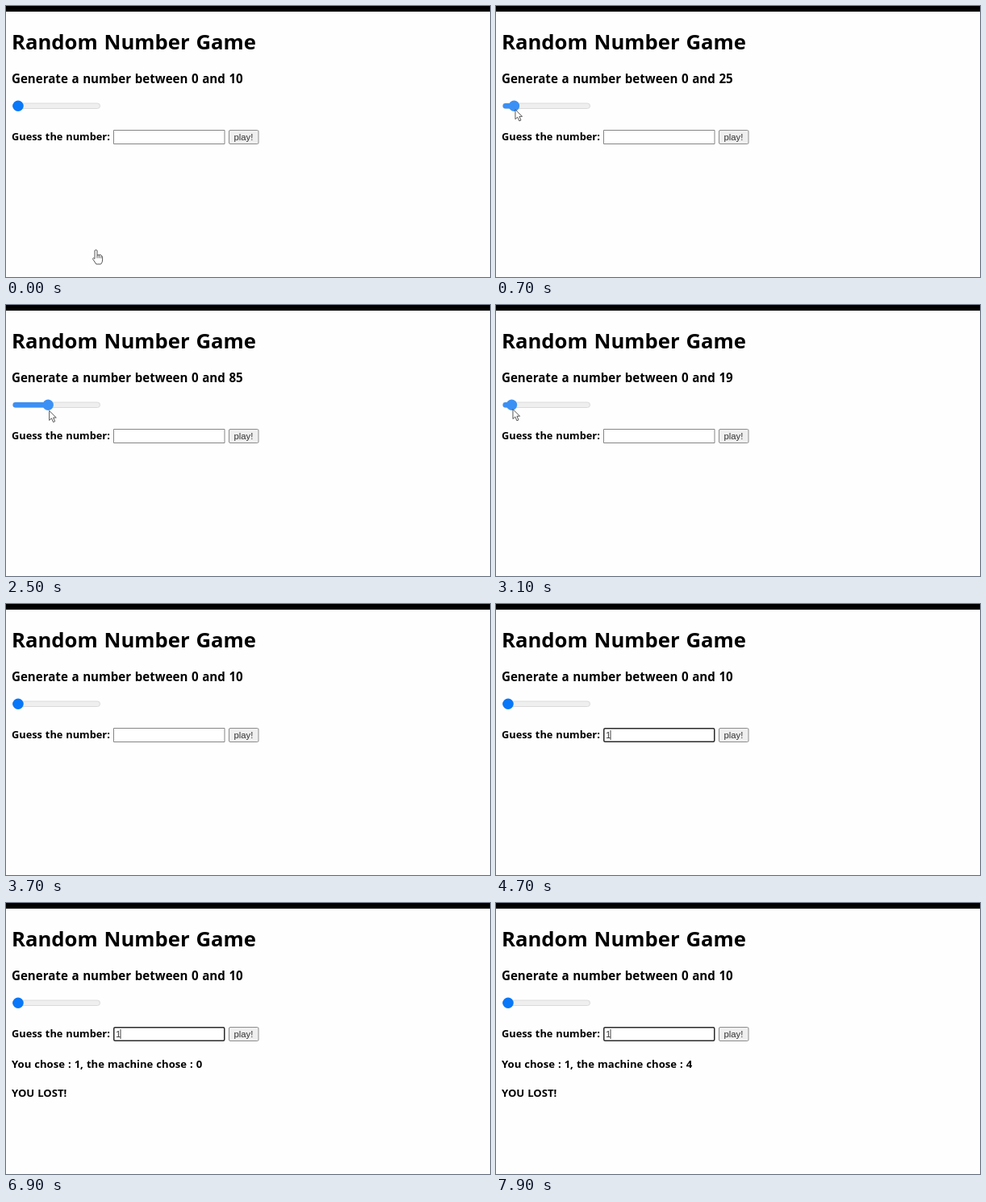
These frames come from a looping animation (600x337 px, 8 s). An HTML page with a canvas:

```html
<!DOCTYPE html>
<html lang="en">
<head>
<meta charset="utf-8">
<title>Random Number Game</title>
<style>
  html, body { margin: 0; width: 100%; height: 100%; overflow: hidden; background: #fefefe; }
  canvas { display: block; width: 600px; height: 337px; }
</style>
</head>
<body>
<canvas id="stage"></canvas>
<script>
const LOOP = 8000, TICK = 100;
const GRAB = 500, RELEASE = 3200, LEAVE = 3500, FOCUS = 3800, TYPE = 4400, RESULT = 5000;
const HEADING = '"Open Sans", "Noto Sans", sans-serif';
const CONTROL = '"Liberation Sans", Arial, sans-serif';

const canvas = document.getElementById('stage');
const ctx = canvas.getContext('2d');
const ratio = window.devicePixelRatio || 1;
canvas.width = 600 * ratio;
canvas.height = 337 * ratio;

const progress = (t, from, to) => Math.min(1, Math.max(0, (t - from) / (to - from)));
const mix = (a, b, u) => a + (b - a) * u;

// The drag goes right and back again at one steady speed.
const sliderValue = t => Math.max(10, Math.round(153 - 0.109 * Math.abs(t - 1875)));
const thumbX = value => 15 + (value - 10) * 0.4956;

function pointerAt(t) {
  const arrive = progress(t, 0, GRAB);
  const leave = progress(t, RELEASE, LEAVE + TICK);
  const dragX = thumbX(sliderValue(t)) + 1.5;
  const dragY = 130 + 2 * Math.sin((t - 1100) / 600);
  return [
    mix(mix(110, dragX, arrive), 70, leave),
    mix(mix(304, dragY, arrive), 154, leave)
  ];
}

function machineNumber(t) {
  const round = Math.max(0, Math.floor((t - 5400) / 480));
  return (4 + 2 * round) % 10;
}

function heading(str, baseline, size) {
  ctx.font = `700 ${size}px ${HEADING}`;
  ctx.wordSpacing = `${size * 0.045}px`;
  ctx.fillStyle = '#000';
  ctx.fillText(str, 7, baseline);
}

function label(str, x, baseline) {
  ctx.font = `11.3px ${CONTROL}`;
  ctx.wordSpacing = '0px';
  ctx.fillStyle = '#333';
  ctx.fillText(str, x, baseline);
}

function box(x, y, w, h, radius, fill, stroke, line = 1) {
  ctx.beginPath();
  ctx.roundRect(x + line / 2, y + line / 2, w - line, h - line, radius);
  ctx.fillStyle = fill;
  ctx.fill();
  if (!stroke) return;
  ctx.strokeStyle = stroke;
  ctx.lineWidth = line;
  ctx.stroke();
}

function slider(value, hover) {
  const x = thumbX(value);
  const blue = hover ? '#3b90f5' : '#0877f8';
  box(8, 120.5, 109, 7.5, 3.5, '#efefef', '#dadada');
  box(8, 120.5, x - 8, 7.5, 3.5, blue);
  ctx.beginPath();
  ctx.arc(x, 124.3, 6.7, 0, Math.PI * 2);
  ctx.fillStyle = blue;
  ctx.fill();
}

const arrow = new Path2D('M0 0V12L2.8 9.4L4.9 14.2L7 13.3L5 8.6H8.6Z');
const hand = new Path2D('M0 0Q1.5-1.5 3 0V6Q8 4 9.6 8V12Q9.6 15 7.6 17H1.8L-2.5 10.5Q-2 8 0 10.4Z' +
  'M3 6V9.5M5.4 6V9.5M7.8 6.7V9.7');

function pointer(shape, x, y) {
  ctx.save();
  ctx.translate(x, y);
  ctx.fillStyle = '#fff';
  ctx.fill(shape);
  ctx.strokeStyle = '#444';
  ctx.lineWidth = 0.9;
  ctx.lineJoin = 'round';
  ctx.stroke(shape);
  ctx.restore();
}

function guessField(t) {
  const focused = t >= FOCUS, typed = t >= TYPE;
  if (focused) box(133, 154, 138.5, 18, 1.5, '#fff', '#2a2a2a', 1.5);
  else box(133, 154, 138.5, 18, 0, '#fff', '#858585');
  if (typed) label('1', 136, 167);
  const caretOn = (t + 960) % 1060 < 530;
  if (focused && caretOn) {
    ctx.fillStyle = '#444';
    ctx.fillRect(typed ? 141.5 : 136, 157, 1, 12);
  }
}

function draw(t) {
  ctx.setTransform(ratio, 0, 0, ratio, 0, 0);
  ctx.fillStyle = '#fefefe';
  ctx.fillRect(0, 0, 600, 337);
  ctx.fillStyle = '#000';
  ctx.fillRect(0, 0, 600, 7);

  const value = sliderValue(t);
  heading('Random Number Game', 54, 25.7);
  heading(`Generate a number between 0 and ${value}`, 96, 15.1);
  slider(value, t >= GRAB && t < LEAVE);

  heading('Guess the number:', 166.5, 12.8);
  guessField(t);
  box(276, 154, 37.5, 18, 1.5, '#efefef', '#8c8c8c');
  label('play!', 282.5, 166.5);

  if (t >= RESULT) {
    heading(`You chose : 1, the machine chose : ${machineNumber(t)}`, 204.7, 13.1);
    heading('YOU LOST!', 240.7, 13.1);
  }

  if (t <= LEAVE) pointer(t < 200 ? hand : arrow, ...pointerAt(t));
}

function frame(now) {
  draw(Math.floor(now % LOOP / TICK) * TICK);
  requestAnimationFrame(frame);
}
requestAnimationFrame(frame);
</script>
</body>
</html>
```
